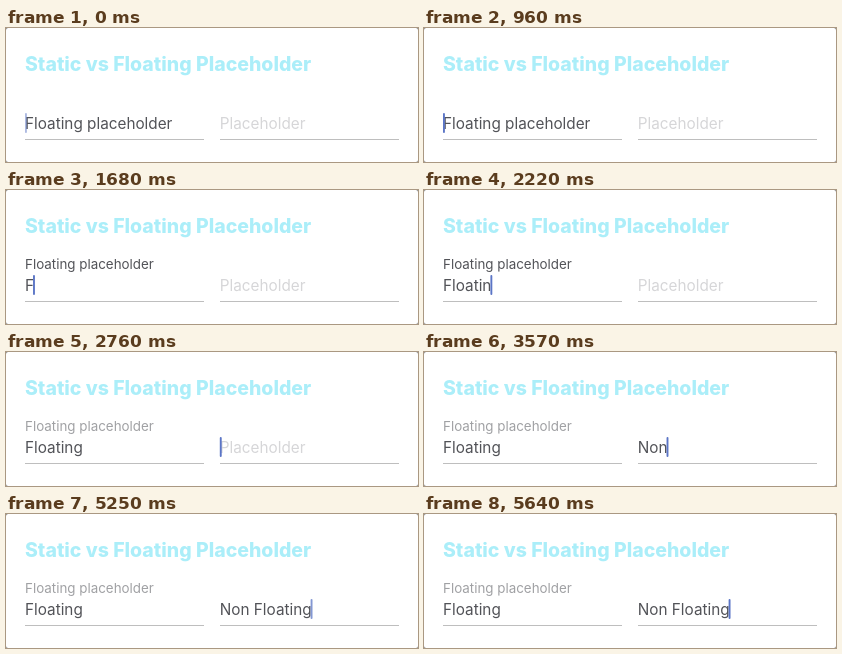
Write an HTML page that moves like this. It is 412 px wide and 134 px high and loops after 5.7 s.

```html
<!DOCTYPE html>
<html lang="en">
<head>
<meta charset="utf-8">
<title>Static vs Floating Placeholder</title>
<style>
  html, body { margin: 0; width: 100%; height: 100%; overflow: hidden; background: #8c8c8c; }
  svg { display: block; width: 100%; height: 100%; }
  text { font: 400 15.3px Inter, "Open Sans", sans-serif; fill: #525358; white-space: pre; }
  .title { font-size: 19.5px; font-weight: 800; fill: #abeef9; }
  .hint { fill: #d6d6d8; }
  .rule { stroke: #bebebe; stroke-width: 1; }
</style>
</head>
<body>
<svg viewBox="0 0 412 134">
  <rect width="412" height="134" rx="2.5" fill="#fff"/>
  <text class="title" x="19" y="42.5">Static vs Floating Placeholder</text>
  <path class="rule" d="M19 111.5H198M214 111.5H393"/>
  <text id="label">Floating placeholder</text>
  <text id="hint" class="hint" x="213.8" y="101">Placeholder</text>
  <text id="left" x="19" y="101"></text>
  <text id="right" x="213.8" y="101"></text>
  <rect id="caret" y="85" width="1.9" height="20" rx="0.9" fill="#5b75c6"/>
</svg>
<script>
const LOOP = 5700, STEP = 30;
const FOCUS_MOVE = 2730;
const $ = id => document.getElementById(id);
const label = $('label'), hint = $('hint'), caret = $('caret');

// Time at which each character appears
const fields = {
  left: { el: $('left'), x: 19, text: 'Floating',
    keys: [1410, 1710, 1800, 1890, 1980, 2070, 2220, 2250] },
  right: { el: $('right'), x: 213.8, text: 'Non Floating',
    keys: [3180, 3390, 3570, 3660, 3780, 3990, 4110, 4200, 4290, 4500, 4650, 4740] }
};

// Caret opacity over time
const blink = [[0, 0.5], [150, 1], [510, 1], [630, 0], [810, 0], [960, 1],
  [5220, 1], [5340, 0], [5520, 0], [5640, 1], [LOOP, 1]];

const mix = (a, b, k) => a + (b - a) * k;
const ramp = (t, from, to) => Math.min(1, Math.max(0, (t - from) / (to - from)));
const smooth = k => k * k * (3 - 2 * k);

function opacityAt(t) {
  const i = blink.findIndex(([time]) => time > t);
  const [t0, v0] = blink[i - 1], [t1, v1] = blink[i];
  return mix(v0, v1, ramp(t, t0, t1));
}

function type(field, t) {
  const count = field.keys.filter(k => k <= t).length;
  field.el.textContent = field.text.slice(0, count);
  return count;
}

function draw(t) {
  type(fields.left, t);
  hint.style.display = type(fields.right, t) ? 'none' : '';

  const rise = smooth(ramp(t, 1380, 1650));
  const y = mix(101, 79, rise), scale = mix(1, 0.875, rise);
  label.setAttribute('transform', `translate(19 ${y}) scale(${scale})`);
  const fade = ramp(t, 2700, 2760);
  const tone = [[82, 160], [83, 161], [88, 164]].map(([a, b]) => Math.round(mix(a, b, fade)));
  label.style.fill = `rgb(${tone})`;

  const active = t < FOCUS_MOVE ? fields.left : fields.right;
  const width = active.el.textContent ? active.el.getComputedTextLength() : 0;
  caret.setAttribute('x', active.x + Math.max(0, width - 1));
  caret.setAttribute('opacity', opacityAt(t));
}

function tick() {
  const t = performance.now() % LOOP;
  draw(Math.floor(t / STEP) * STEP);
  requestAnimationFrame(tick);
}
tick();
</script>
</body>
</html>
```
